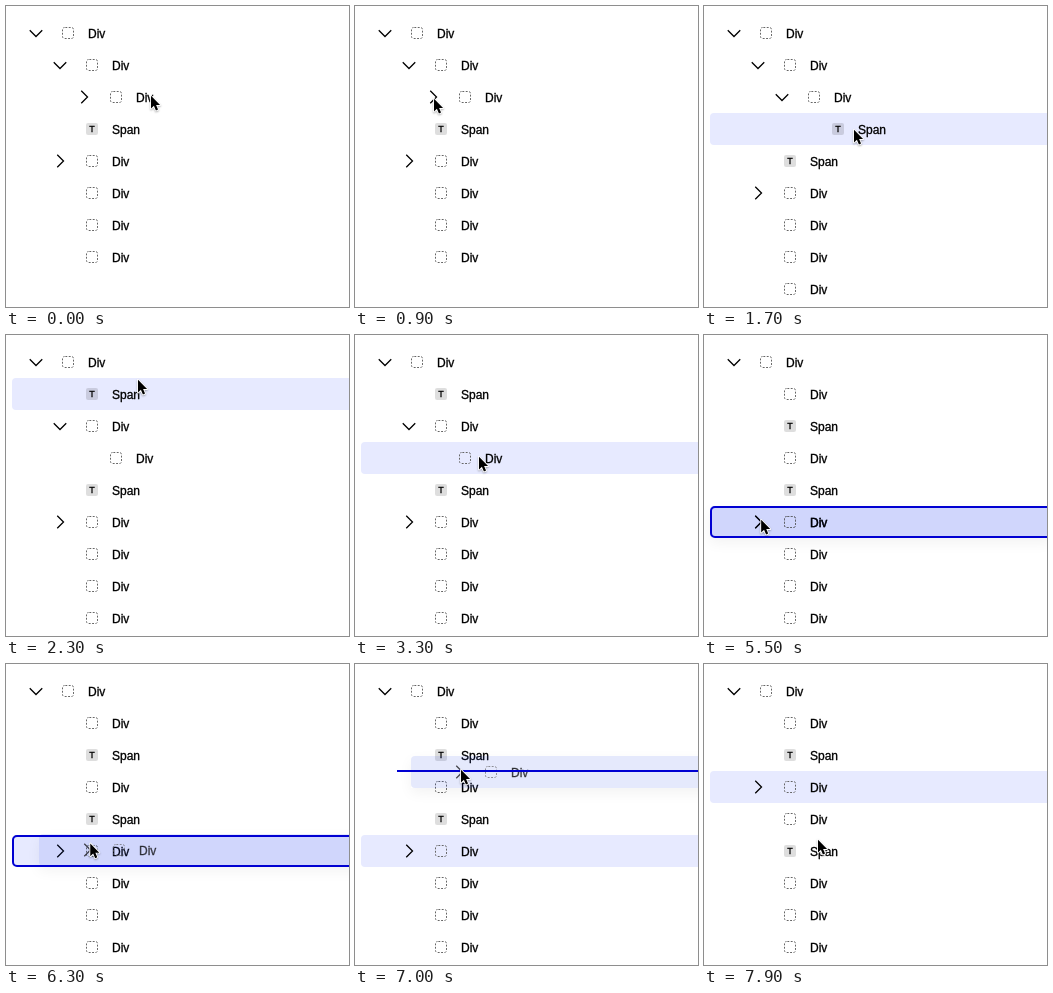
Recreate the animation shown at these times as an HTML page with a canvas. Size 343 by 301 pixels, loop 8 s.

```html
<!DOCTYPE html>
<html lang="en">
<head>
<meta charset="utf-8">
<title>Tree drag and drop</title>
<style>
html, body { margin: 0; width: 100%; height: 100%; overflow: hidden; background: #fff; }
canvas { display: block; width: 343px; height: 301px; }
</style>
</head>
<body>
<canvas id="stage" width="343" height="301"></canvas>
<script>
const W = 343, H = 301, LOOP = 8000, STEP = 100;
const TOP = 11, ROW = 32, LEFT = 6, INDENT = 24, EDGE = 5;
const BLUE = '#0000d2', SELECTED = '#e7eaff';
const FONT = '"Liberation Sans", Arial, sans-serif';
const ctx = document.getElementById('stage').getContext('2d');

// Row code: kind (D = Div, S = Span), depth, optional chevron (v open, > closed).
const parseTree = text => text.split(' ').map(code => ({
  span: code[0] === 'S', depth: +code[1], chevron: code[2]
}));
const closed = parseTree('D0v D1v D2> S1 D1> D1 D1 D1');
const opened = parseTree('D0v D1v D2v S3 S1 D1> D1 D1 D1');
const spanMoved = parseTree('D0v S1 D1v D2 S1 D1> D1 D1 D1');
const divMoved = parseTree('D0v D1 S1 D1 S1 D1> D1 D1 D1');
const branchMoved = parseTree('D0v D1 S1 D1> D1 S1 D1 D1 D1');

const states = [
  { at: 0, rows: closed },
  { at: 1000, rows: opened },
  { at: 1700, rows: opened, selected: 3 },
  { at: 2300, rows: spanMoved, selected: 1 },
  { at: 3300, rows: spanMoved, selected: 3 },
  { at: 3700, rows: divMoved, selected: 1 },
  { at: 5300, rows: divMoved, selected: 5 },
  { at: 7200, rows: branchMoved, selected: 3 }
];

// The selected row is dragged during these spans.
const drags = [[1800, 2300], [3400, 3700], [5500, 7200]];

// Eased pointer moves: start, end, destination
const origin = { x: 144, y: 88 };
const moves = [
  [300, 900, 78, 91],
  [1200, 1500, 149, 122],
  [1700, 2200, 131, 43],
  [2500, 3200, 123, 120],
  [3300, 3600, 123, 32],
  [4100, 4600, 126, 196],
  [4700, 5200, 55, 183],
  [5400, 6200, 82, 182],
  [6200, 6900, 105, 104],
  [7300, 7900, 113, 174]
];

const rowTop = i => TOP + ROW * i;

function pointerAt(t) {
  return moves.reduce((p, [from, to, x, y]) => {
    const u = Math.min(1, Math.max(0, (t - from) / (to - from)));
    const s = u * u * (3 - 2 * u);
    return { x: p.x + (x - p.x) * s, y: p.y + (y - p.y) * s };
  }, origin);
}

function roundRect(x, y, w, h, r) {
  ctx.beginPath();
  ctx.roundRect(x, y, w, h, r);
}

function polyline(points) {
  ctx.beginPath();
  points.forEach(([x, y]) => ctx.lineTo(x, y));
}

// A hairline stroke gives the text its slightly heavier weight.
function drawText(text, x, y, size, align) {
  ctx.font = `${size}px ${FONT}`;
  ctx.textAlign = align;
  ctx.fillStyle = ctx.strokeStyle = '#000';
  ctx.lineWidth = .3;
  ctx.fillText(text, x, y);
  ctx.strokeText(text, x, y);
}

function drawChevron(x, y, open) {
  ctx.save();
  ctx.translate(x, y);
  if (open) ctx.rotate(Math.PI / 2);
  polyline([[-2.75, -6.25], [3.5, 0], [-2.75, 6.25]]);
  ctx.strokeStyle = '#000';
  ctx.lineWidth = 1.3;
  ctx.stroke();
  ctx.restore();
}

// Three dashes per side, with one centred on each corner.
function drawBoxIcon(x, y) {
  const size = 11, r = 2, straight = size - 2 * r, arc = Math.PI * r / 2;
  const period = (straight + arc) / 3, dash = 1.9;
  roundRect(x - size / 2, y - size / 2, size, size, r);
  ctx.setLineDash([dash, period - dash]);
  ctx.lineDashOffset = dash / 2 - straight - arc / 2;
  ctx.strokeStyle = '#666';
  ctx.lineWidth = 1;
  ctx.stroke();
  ctx.setLineDash([]);
}

function drawTextIcon(x, y) {
  roundRect(x - 6, y - 6, 12, 12, 2);
  ctx.fillStyle = 'rgba(0,0,0,.13)';
  ctx.fill();
  drawText('T', x, y + 3, 9, 'center');
}

function drawRow(row, top) {
  const x = row.depth * INDENT, y = top + ROW / 2;
  if (row.chevron) drawChevron(30 + x, y, row.chevron === 'v');
  (row.span ? drawTextIcon : drawBoxIcon)(62 + x, y);
  drawText(row.span ? 'Span' : 'Div', 82 + x, y + 5, 12, 'left');
}

function drawGhost(row, top) {
  // Soft shadow, kept outside the translucent panel.
  ctx.save();
  ctx.beginPath();
  ctx.rect(-W, -H, W * 3, H * 3);
  ctx.rect(LEFT, top, W, ROW);
  ctx.clip('evenodd');
  ctx.shadowColor = 'rgba(0,0,0,.05)';
  ctx.shadowBlur = 14;
  ctx.shadowOffsetY = 5;
  ctx.fillStyle = '#fff';
  ctx.fillRect(LEFT, top, W, ROW);
  ctx.restore();

  roundRect(LEFT, top, W, ROW, 4);
  ctx.fillStyle = 'rgba(0,40,220,.1)';
  ctx.fill();
  ctx.globalAlpha = .7;
  drawRow(row, top);
}

// Near a row boundary the drop goes between rows, otherwise into the row.
function drawDropTarget(rows, y) {
  const boundary = Math.round((y - TOP) / ROW);
  if (Math.abs(y - rowTop(boundary)) <= EDGE) {
    const x = 18 + INDENT * rows[boundary].depth;
    ctx.fillStyle = BLUE;
    ctx.fillRect(x, rowTop(boundary) - 1, W - x, 2);
  } else {
    roundRect(LEFT + 1, rowTop(Math.floor((y - TOP) / ROW)) + 1, W, ROW - 2, 4);
    ctx.strokeStyle = BLUE;
    ctx.lineWidth = 2;
    ctx.stroke();
  }
}

function drawPointer({ x, y }) {
  ctx.save();
  ctx.translate(x + 1, y + 1.8);
  ctx.scale(.88, .88);
  polyline([[0, 0], [0, 14.5], [3.3, 11.4], [5.6, 16.7], [8, 15.7], [5.8, 10.5], [10.3, 10.5]]);
  ctx.closePath();
  ctx.lineJoin = 'round';
  ctx.strokeStyle = '#fff';
  ctx.lineWidth = 2;
  ctx.shadowColor = 'rgba(0,0,0,.3)';
  ctx.shadowBlur = 2;
  ctx.shadowOffsetY = 1;
  ctx.stroke();
  ctx.shadowColor = 'transparent';
  ctx.fillStyle = '#000';
  ctx.fill();
  ctx.restore();
}

function draw(t) {
  const { rows, selected } = states.findLast(state => state.at <= t);
  const drag = drags.find(([from, to]) => t >= from && t < to);
  const pointer = pointerAt(t);

  ctx.fillStyle = '#fff';
  ctx.fillRect(0, 0, W, H);
  if (selected !== undefined) {
    roundRect(LEFT, rowTop(selected), W, ROW, 4);
    ctx.fillStyle = SELECTED;
    ctx.fill();
  }
  rows.forEach((row, i) => drawRow(row, rowTop(i)));

  if (drag) {
    // The ghost trails the pointer by one step.
    const grab = pointerAt(drag[0] - STEP), held = pointerAt(t - STEP);
    ctx.save();
    ctx.translate(Math.round(held.x - grab.x), Math.round(held.y - grab.y));
    drawGhost(rows[selected], rowTop(selected));
    ctx.restore();
    drawDropTarget(rows, pointer.y);
  }
  drawPointer(pointer);
}

const start = performance.now();
function tick() {
  const t = (performance.now() - start) % LOOP;
  draw(Math.floor(t / STEP) * STEP);
  requestAnimationFrame(tick);
}
tick();
</script>
</body>
</html>
```
